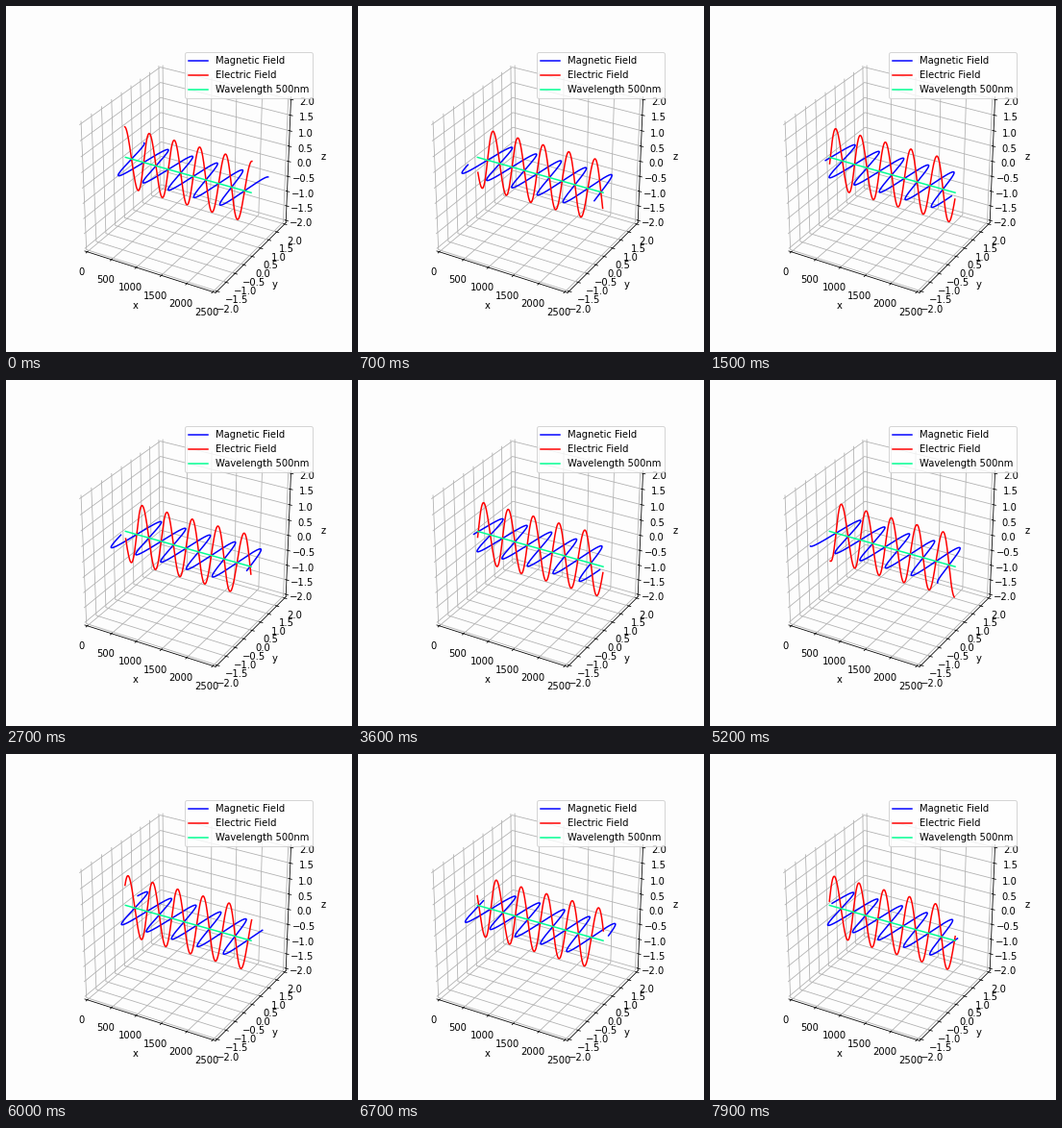
A matplotlib script that plays this animation: 360 by 360 pixels, repeating every 8000 ms.

```python
import numpy as np
import matplotlib.pyplot as plt
from matplotlib.animation import FuncAnimation

WAVELENGTH = 500
LENGTH = 2500
STEP = 0.3  # phase advance per frame, radians
FRAMES = 80
PAPER = "#fdfdfd"

plt.rcParams["font.family"] = "DejaVu Sans"
plt.rcParams["font.size"] = 10

fig = plt.figure(figsize=(5, 5), dpi=72, facecolor=PAPER)
ax = fig.add_axes([0.125, 0.125, 0.775, 0.755], projection="3d", facecolor=PAPER)
# Fill the whole axes rectangle with a unit cube instead of a square viewport
ax.apply_aspect = lambda position=None: None
ax.set_box_aspect((1, 1, 1), zoom=np.sqrt(3) / 1.8294640721620434)
ax.view_init(elev=30, azim=-60)

x = np.linspace(0, LENGTH, 1001)
flat = np.zeros_like(x)


def wave(frame):
    return np.cos(2 * np.pi * x / WAVELENGTH + STEP * frame)


magnetic, = ax.plot(x, wave(0), flat, color="blue", lw=1.5, label="Magnetic Field")
electric, = ax.plot(x, flat, wave(0), color="red", lw=1.5, label="Electric Field")
ax.plot(x, flat, flat, color=(0, 1, 0.5 ** 0.8), lw=1.5,
        label=f"Wavelength {WAVELENGTH}nm")


def padded(low, high):
    pad = (high - low) / 48
    return low - pad, high + pad


ax.set_xticks(np.arange(0, LENGTH + 1, 500))
ax.set_yticks(np.arange(-2, 2.1, 0.5))
ax.set_zticks(np.arange(-2, 2.1, 0.5))
ax.set_xlim(*padded(0, LENGTH))
ax.set_ylim(*padded(-2, 2))
ax.set_zlim(*padded(-2, 2))
ax.set_xlabel("x")
ax.set_ylabel("y")
ax.set_zlabel("z")
for axis in (ax.xaxis, ax.yaxis, ax.zaxis):
    axis.set_pane_color((1, 1, 1, 0))
ax.legend(loc="upper right", facecolor="white")


def update(frame):
    w = wave(frame)
    magnetic.set_data_3d(x, w, flat)
    electric.set_data_3d(x, flat, w)
    return magnetic, electric


anim = FuncAnimation(fig, update, frames=FRAMES, interval=100,
                     repeat=True, repeat_delay=0, blit=False)
plt.show()
```
